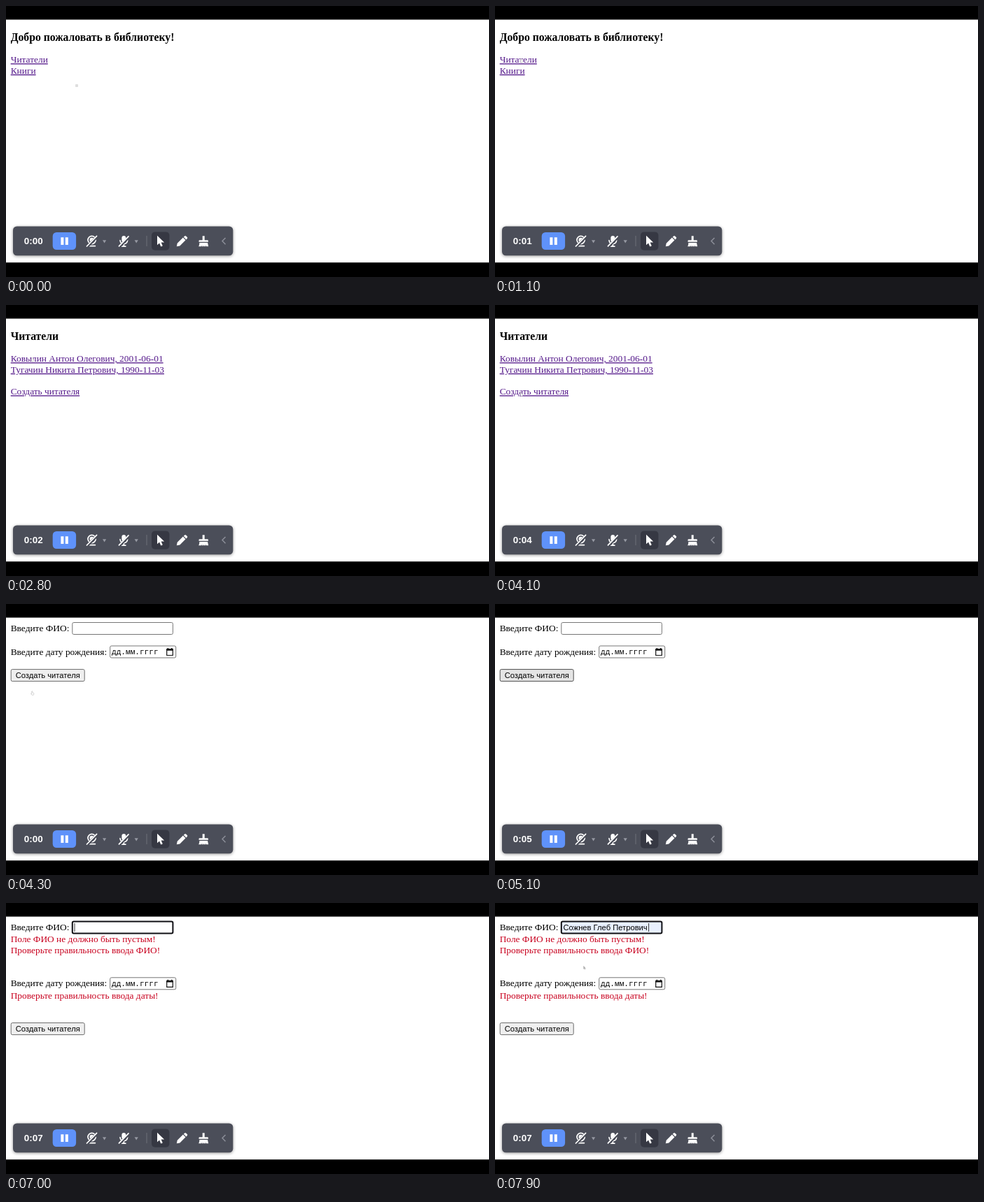
These frames come from a looping animation (690x388 px, 8000 ms). An HTML page:

```html
<!DOCTYPE html>
<html lang="ru">
<head>
<meta charset="utf-8">
<title>Библиотека</title>
<style>
html, body { margin: 0; width: 100%; height: 100%; overflow: hidden; background: #fff; }
svg { display: block; width: 690px; height: 388px; }
text { white-space: pre; font: 13.4px "Liberation Serif", "Times New Roman", serif; fill: #000; }
.head { font-size: 15.7px; font-weight: bold; }
.link { fill: #551a8b; text-decoration: underline; }
.link.active { fill: #e00; }
.err { fill: #c8001e; }
.ui { font: 11.2px "Liberation Sans", Arial, sans-serif; }
.mono { font: 11.1px "Liberation Mono", monospace; }
.field { fill: #fff; stroke: #767676; stroke-width: 1; }
.field.focus { stroke: #101014; stroke-width: 2; }
.field.filled { fill: #e8f0fe; }
.btn { fill: #efefef; stroke: #6b6b6b; }
.btn.hover { fill: #e5e5e5; stroke: #4c4c4c; }
.btn.press { fill: #f5f5f5; stroke: #8a8a8a; }
.bar { filter: drop-shadow(0 1px 2px rgba(0, 0, 0, .4)); }
#clock { font: bold 13.4px "Liberation Sans", Arial, sans-serif; fill: #fff; }
</style>
</head>
<body>
<svg viewBox="0 0 690 388">
  <rect width="690" height="388" fill="#fff"/>

  <g id="home">
    <text class="head" x="6.7" y="49.5">Добро пожаловать в библиотеку!</text>
    <text class="link" id="readers" x="6.7" y="81.2">Читатели</text>
    <text class="link" x="6.7" y="96.9">Книги</text>
  </g>

  <g id="list">
    <text class="head" x="6.7" y="49.5">Читатели</text>
    <text class="link" x="6.7" y="81.2">Ковылин Антон Олегович, 2001-06-01</text>
    <text class="link" x="6.7" y="96.9">Тугачин Никита Петрович, 1990-11-03</text>
    <text class="link" x="6.7" y="128.3">Создать читателя</text>
  </g>

  <g id="form">
    <text x="6.7" y="39">Введите ФИО:</text>
    <rect class="field" id="name" x="94.8" y="26.5" width="143.6" height="17" rx="2"/>
    <text class="ui" id="typed" x="97.5" y="39">Сожнев Глеб Петрович</text>
    <path id="caret" d="M0 29V41" stroke="#222" stroke-width=".9"/>
    <g id="errors">
      <text class="err" x="6.7" y="56.4">Поле ФИО не должно быть пустым!</text>
      <text class="err" x="6.7" y="72.1">Проверьте правильность ввода ФИО!</text>
      <text class="err" x="6.7" y="136.9">Проверьте правильность ввода даты!</text>
    </g>
    <g id="date">
      <text x="6.7" y="72.5">Введите дату рождения:</text>
      <rect class="field" x="148.7" y="60" width="94" height="17" rx="2"/>
      <text class="mono" x="151" y="72.3">дд.мм.гггг</text>
      <path d="M229.7 65.3h8.6v8.2h-8.6z" fill="none" stroke="#111" stroke-width="1.2"/>
      <path d="M229.2 64h9.6v2.7h-9.6zM230.6 63h1.5v2h-1.5zM236 63h1.5v2h-1.5z" fill="#111"/>
    </g>
    <g id="send">
      <rect class="btn" id="btn" x="7.2" y="93.6" width="105" height="17" rx="2"/>
      <text class="ui" x="59.7" y="106" text-anchor="middle">Создать читателя</text>
    </g>
  </g>

  <g id="pointer">
    <rect id="blob" x="-2" y="-2" width="4" height="4" rx=".8" fill="#dedede"/>
    <path id="hand" d="M-.8 1V-2.4q.7-.9 1.2 0V-.5L2 0q.6.3.4 1L1.8 2.8H-.6L-2 .8q.3-.8 1.2.2z" fill="#fff" stroke="#aaa" stroke-width=".5"/>
    <path id="arrow" d="M-1-2.4V2L0 1.2 .7 2.7 1.5 2.3 .9 .9H2z" fill="#aaa" stroke="#bbb" stroke-width=".4"/>
  </g>

  <path d="M0 0H690V19.4H0zM0 367.3H690V388H0z" fill="#000"/>

  <rect class="bar" x="10" y="315.5" width="314.3" height="41.8" rx="5.5" fill="#4b4e59"/>
  <text id="clock" x="25.8" y="341">0:00</text>
  <rect x="66.7" y="324" width="33.4" height="25" rx="5.5" fill="#5f92fa"/>
  <path d="M78.4 331.2h4v10.8h-4zM84.8 331.2h4v10.8h-4z" fill="#fff"/>

  <g fill="none" stroke="#fff" stroke-width="1.7" stroke-linecap="round">
    <circle cx="122.6" cy="335" r="5.6"/>
    <circle cx="122.6" cy="335" r="2.3" fill="#fff"/>
    <path d="M118 343.6h9.4"/>
    <path d="M116 344.6L130 330.4" stroke="#4b4e59" stroke-width="4"/>
    <path d="M115.4 344L129.6 329.4"/>
    <rect x="166.2" y="329.8" width="4.2" height="7.6" rx="2.1" fill="#fff"/>
    <path d="M163 335.5q.4 5 5.3 5t5.3-5M168.3 340.6V344M165.8 344.2h5"/>
    <path d="M162.3 344.4L175.6 331" stroke="#4b4e59" stroke-width="3.6"/>
    <path d="M161.4 343.8L175 329.8"/>
  </g>
  <path d="M138 335.2h5.2l-2.6 4.2zM183.6 335.2h5.2l-2.6 4.2z" fill="#9699a3"/>
  <path d="M201 329V344" stroke="#6e717b"/>

  <rect x="208" y="323.4" width="25.4" height="26.4" rx="5" fill="#363843"/>
  <g fill="#fff">
    <path d="M216 328.8V342.2l3.1-2.7 2.2 5 2.5-1.1-2.2-4.8h4.5z"/>
    <path d="M243.8 344.3l.9-4.5 8.2-8.2 3.6 3.6-8.2 8.2zM253.8 330.7l1.3-1.3q1-.8 2 0l1.7 1.7q.8 1 0 2l-1.3 1.3z"/>
    <path d="M280.7 329.2h3v6h4.2q1 0 1 1v1.6h-13.4v-1.6q0-1 1-1h4.2zM276.4 338.9h11.6l1.2 5.3h-3.1l-.7-2.3v2.3h-2.3v-2.3l-.7 2.3h-2.2v-2.3l-.8 2.3h-4.2q1.2-2.2 1.2-5.3z"/>
  </g>
  <path d="M313.5 332L309 336.6 313.5 341.2" fill="none" stroke="#8b8e98" stroke-width="1.5"/>
</svg>
<script>
const LOOP = 8000, STEP = 100;
const $ = id => document.getElementById(id);
const show = (id, on) => { $(id).style.display = on ? "" : "none"; };
const within = (t, a, b) => t >= a && t < b;
const ease = k => k * k * (3 - 2 * k);

// time, x, y
const path = [
  [0, 101, 114], [900, 37.5, 78], [2800, 37.5, 78], [3600, 37.5, 127.5],
  [4500, 37.5, 127.5], [4800, 50, 104], [5800, 50, 104], [6200, 160, 36],
  [7100, 160, 36], [7400, 127.5, 92.5], [LOOP, 127.5, 92.5]
];

// page loads reset the clock for a moment
const resets = [[2000, 2100], [4200, 4400], [5300, 5400]];

function pointerAt(t) {
  const i = path.findIndex(p => p[0] > t);
  const [t0, x0, y0] = path[i - 1], [t1, x1, y1] = path[i];
  const k = ease((t - t0) / (t1 - t0));
  return [x0 + (x1 - x0) * k, y0 + (y1 - y0) * k];
}

function draw(t) {
  const failed = t >= 5300, filled = t >= 7500;
  show("home", t < 2000);
  show("list", within(t, 2000, 4200));
  show("form", t >= 4200);
  show("errors", failed);
  $("date").setAttribute("transform", `translate(0 ${failed ? 46.8 : 0})`);
  $("send").setAttribute("transform", `translate(0 ${failed ? 78 : 0})`);

  $("readers").classList.toggle("active", within(t, 1600, 1800));
  $("btn").classList.toggle("hover", within(t, 4700, 5300));
  $("btn").classList.toggle("press", within(t, 5000, 5100));
  $("name").classList.toggle("focus", t >= 6700);
  $("name").classList.toggle("filled", filled);
  show("typed", filled);
  show("caret", within(t, 6700, 7200) || filled);
  $("caret").setAttribute("transform", `translate(${filled ? 219.6 : 98} 0)`);

  const [x, y] = pointerAt(t);
  $("pointer").setAttribute("transform", `translate(${x} ${y})`);
  show("pointer", !within(t, 5900, 7200));
  show("blob", t < 900);
  show("hand", within(t, 900, 4700));
  show("arrow", t >= 4700);

  const reset = resets.some(([a, b]) => within(t, a, b));
  $("clock").textContent = "0:0" + (reset ? 0 : Math.floor(t / 1000));
}

const start = performance.now();
function frame(now) {
  const t = Math.max(0, now - start) % LOOP;
  draw(Math.floor(t / STEP) * STEP);
  requestAnimationFrame(frame);
}
draw(0);
requestAnimationFrame(frame);
</script>
</body>
</html>
```
